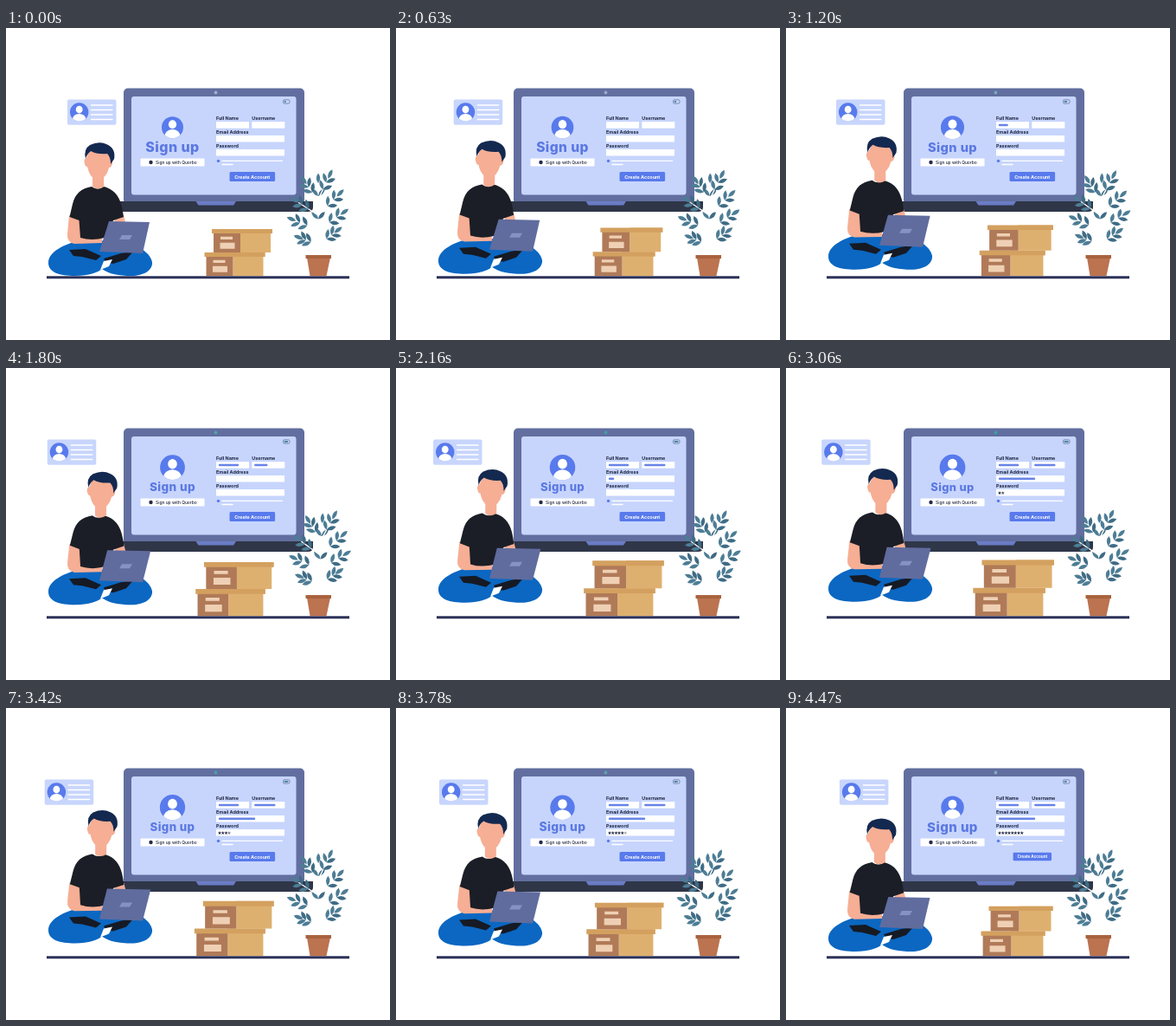
Animation, 444 px wide and 360 px high, one loop 4500 ms. Source, as an HTML page:

```html
<!DOCTYPE html>
<html lang="en">
<head>
<meta charset="utf-8">
<title>Sign up</title>
<style>
html, body { margin: 0; width: 100%; height: 100%; overflow: hidden; background: #fff }
svg { display: block; width: 444px; height: 360px }
text { font: 700 5.4px Inter, "Open Sans", sans-serif; fill: #1d2440 }
.white { fill: #fff }
.blue { fill: #587aec }
.skin { fill: #f6ae94 }
.typed { stroke: #6884e8; stroke-width: 2.4; stroke-linecap: round }
.rule { fill: none; stroke: #fff; stroke-width: 1.4; stroke-linecap: round }
#title { font-size: 16px; font-weight: 800; letter-spacing: .45px; fill: #5b78e2 }
#stars text { font: 5.6px "DejaVu Sans", sans-serif }
</style>
</head>
<body>
<svg viewBox="0 0 444 360">
  <defs>
    <clipPath id="round"><circle r="12.5"/></clipPath>
    <g id="avatar">
      <circle class="blue" r="12.5"/>
      <g class="white" clip-path="url(#round)">
        <ellipse cy="-3.4" rx="4.6" ry="5"/>
        <ellipse cy="10" rx="9" ry="7.8"/>
      </g>
    </g>
    <g id="box">
      <path fill="#deb06f" d="M33 0H70V5H68V27H33Z"/>
      <path fill="#b07a58" d="M2 4H33V27H2Z"/>
      <path fill="#d3a05f" d="M0 0H70V5H0Z"/>
      <path fill="#efd0b4" d="M10 8.8h14v3.2h-14zM9.500 15.800h17v7h-17z"/>
    </g>
  </defs>

  <g id="card">
    <rect y="82.5" width="56.5" height="29.3" rx="2" fill="#c8d6fd"/>
    <use href="#avatar" transform="translate(13.7 97) scale(.86)"/>
    <path class="rule" d="M27.5 89H52M27.5 94.5H52M27.5 100H52M27.5 105.5H52"/>
  </g>

  <g id="monitor">
    <rect x="136" y="69.5" width="209" height="134" rx="5" fill="#616e9f"/>
    <rect x="145" y="79" width="190.5" height="113.5" rx="3" fill="#c7d5fd"/>
    <path d="M126 200H355V207Q355 212 349 212H132Q126 212 126 207Z" fill="#2f3648"/>
    <path d="M219.5 200H266L263 204.5H222.5Z" fill="#6b7cc6"/>
    <circle id="lens" cx="242.5" cy="74.5" r="1.9"/>
    <rect x="320.5" y="82.8" width="7.5" height="4.4" rx="1.5" fill="none" stroke="#5d6a93" stroke-width=".7"/>
    <rect id="charge" x="321.7" y="84" height="2" fill="#4d8a9c"/>

    <use href="#avatar" id="profile"/>
    <text id="title" y="5" text-anchor="middle">Sign up</text>
    <rect class="white" x="155.5" y="150.5" width="74" height="9" rx=".8"/>
    <circle cx="167.5" cy="155" r="2.2" fill="#232a4c"/>
    <text x="173" y="156.8" style="font-size:4.9px;font-weight:500">Sign up with Quorbo</text>

    <g id="form"></g>
    <g id="stars"></g>
    <circle class="blue" cx="245.5" cy="153.4" r="1.7"/>
    <path class="rule" d="M250 153.4H319.5M250 157.5H262"/>
    <g id="button">
      <rect class="blue" x="-26.3" y="-5.5" width="52.6" height="11" rx="1.5"/>
      <text y="2" text-anchor="middle" class="white">Create Account</text>
    </g>
  </g>

  <path d="M47 287.8H397" stroke="#2c3259" stroke-width="3"/>

  <g id="boxes">
    <use href="#box" x="229.5" y="259"/>
    <use href="#box" x="238" y="232"/>
  </g>

  <g id="plant"></g>
  <path fill="#bb7350" d="M348 265H375L370.5 286H351.5Z"/>
  <path fill="#a9633f" d="M346.5 262H376V266H346.5Z"/>

  <g id="person">
    <path fill="#0b67c2" d="M86 245C68 249 49 258 49 271C49 282 62 286 80 286C96 286 106 282 111 278C119 284 131 286 145 286C160 286 170 279 169 270C167 259 152 251 138 246Z"/>
    <path fill="#161a24" d="M73 256L92 255L110 263L104 268L88 264L78 263ZM113 266L133 260L147 258L139 267L124 272L115 270Z"/>
    <path class="white" d="M113 269L123 267L119 275L109 279Z"/>
    <g id="torso">
      <path class="skin" d="M124 217L136 216L138 224L127 227ZM73 216L85 220L87 238L111 241V248L79 249Q70 247 71 237Z"/>
      <path fill="#1b1e26" d="M99 183C87 185 80 191 77 203L73.5 218L84.5 222L86 242Q99 246 114 242L124 222L136 218C134 200 129 187 113 183Q106 188 99 183Z"/>
      <g id="head">
        <path class="skin" d="M100 168H113V183Q106 188 100 183Z"/>
        <path class="skin" d="M93 150Q89 151 91 157Q92 161 94 160Q97 174 106 175Q116 174 119 161Q122 161 123 156Q123 150 120 150Q119 139 106 139Q96 139 93 150Z"/>
        <path fill="#14294f" d="M92 151Q89 140 97 135Q108 130 117 134.5Q127 139 125 151L121 157Q121 149 117 145Q105 146 98 142Q93 146 92 151Z"/>
      </g>
    </g>
    <path id="lid" fill="#606c9e"/>
    <path fill="#8791c4" d="M134 239H146L143 244H131Z"/>
  </g>
</svg>
<script>
const $ = id => document.getElementById(id);
const clamp = v => Math.max(0, Math.min(1, v));
const LOOP = 4500;

function add(parent, tag, attrs, text = '') {
  const el = document.createElementNS('http://www.w3.org/2000/svg', tag);
  for (const name in attrs) el.setAttribute(name, attrs[name]);
  el.textContent = text;
  return $(parent).appendChild(el);
}
const move = (id, value) => $(id).setAttribute('transform', value);
const scaled = (x, y, s) => `translate(${x} ${y}) scale(${s})`;

function field(label, x, y, width, typed, order) {
  add('form', 'text', { x, y: y - 2.1 }, label);
  add('form', 'rect', { class: 'white', x, y, width, height: 7.5 });
  const line = add('form', 'line', { class: 'typed', x1: x + 4, y1: y + 3.8, y2: y + 3.8 });
  return t => {
    const p = clamp((t - 1050 - 530 * order) / (220 + 7 * typed));
    line.setAttribute('x2', x + 4 + typed * p);
    line.style.opacity = p > 0 ? 1 : 0;
  };
}
const fields = [
  field('Full Name', 243, 108.2, 38, 21, 0),
  field('Username', 284.3, 108.2, 38, 22, 1),
  field('Email Address', 243, 124, 79, 40, 2),
  field('Password', 243, 140, 79, 0, 9)
];
const stars = Array.from({ length: 8 }, (_, i) =>
  add('stars', 'text', { x: 244.6 + 3.65 * i, y: 145.8 }, '★'));

// A pale stem carrying leaf pairs and one leaf at its tip.
function branch(x, y, dx, dy) {
  add('plant', 'path', { class: 'rule', d: `M${x} ${y}l${dx} ${dy}`, 'stroke-width': 2 });
  const heading = Math.atan2(dx, -dy) * 180 / Math.PI;
  const leaf = (u, turn) => add('plant', 'path', {
    d: 'M0 0Q-4.5 -6 0 -11.5Q4.5 -6 0 0',
    fill: turn > 0 ? '#3f6c85' : '#4d7d95',
    transform: `translate(${x + dx * u} ${y + dy * u}) rotate(${heading + turn})`
  });
  for (const u of [.5, .82]) for (const turn of [-42, 42]) leaf(u, turn);
  leaf(1, 0);
}
branch(361, 262, 2, -83);
for (const side of [-1, 1])
  for (let i = 0; i < 4; i++)
    branch(362, 250 - 17 * i, side * (18 + 8 * Math.sin(i * 1.3)), -10 - 4 * i - 3 * side);

function draw(t) {
  const wave = (1 + Math.cos(.00114 * (t - 2720))) / 2;
  const sway = 1.8 * Math.cos(2 * Math.PI * (t - 1750) / LOOP);

  move('card', `translate(${71 - 31 * wave})`);
  move('boxes', `translate(298 286) scale(${1 + .2 * wave}) translate(-298 -286)`);
  move('profile', scaled(192.5, 114.7, 1 + .2 * wave));
  move('title', scaled(192.5, 138, 1 - .2 * wave));
  move('plant', `rotate(${sway} 361 262)`);

  move('person', `translate(0 ${-17 * wave})`);
  move('torso', `rotate(${.8 * Math.sqrt(wave)} 106 246)`);
  move('head', `translate(${2.5 * Math.sqrt(wave)})`);
  $('lid').setAttribute('d', `M${119 - 2.5 * wave} 223L${166 + 1.5 * wave} 224L158 260L108 258Z`);

  $('lens').setAttribute('fill', `rgb(${165 - 110 * wave},${175 - 15 * wave},${205 - 45 * wave})`);
  $('charge').setAttribute('width', 2 + 3 * wave);

  fields.forEach(type => type(t));
  stars.forEach((el, i) => el.style.opacity = clamp((t - 2700) / 200 - i));
  move('button', scaled(284.8, 171.5, 1 - .18 * clamp((t - 4290) / 210)));
}

const begin = performance.now();
function tick() {
  draw((performance.now() - begin) % LOOP);
  requestAnimationFrame(tick);
}
tick();
</script>
</body>
</html>
```
